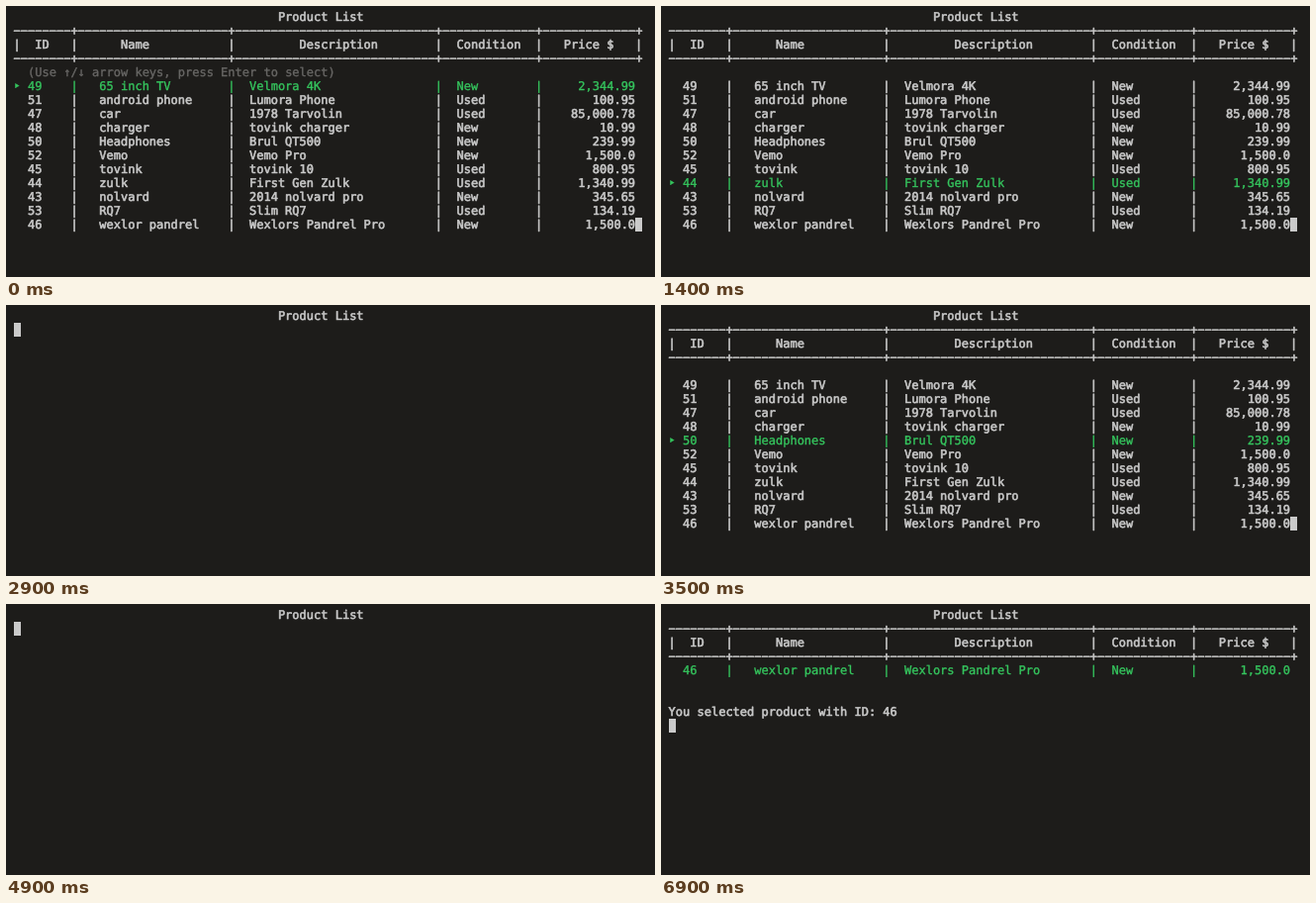
An HTML page with a canvas for the animation above (7 s loop, 656x274 px).

```html
<!DOCTYPE html>
<html lang="en">
<head>
<meta charset="utf-8">
<title>Product List</title>
<style>
  html, body { margin: 0; overflow: hidden; background: #1d1c1a; }
  canvas { display: block; }
</style>
</head>
<body>
<canvas id="screen" width="656" height="274"></canvas>
<script>
const ctx = document.getElementById('screen').getContext('2d');
const LOOP = 7000, TICK = 100;
const LEFT = 7.6, TOP = 4, CELL = 7.224, LINE = 14;
const BG = '#1d1c1a', WHITE = '#cacaca', GREEN = '#35c65e', GREY = '#686765';
const BORDERS = [8, 30, 59, 73];
const LAST_COL = 87, FIRST_ROW = 5;

const products = [
  ['49', '65 inch TV', 'Velmora 4K', 'New', '2,344.99'],
  ['51', 'android phone', 'Lumora Phone', 'Used', '100.95'],
  ['47', 'car', '1978 Tarvolin', 'Used', '85,000.78'],
  ['48', 'charger', 'tovink charger', 'New', '10.99'],
  ['50', 'Headphones', 'Brul QT500', 'New', '239.99'],
  ['52', 'Vemo', 'Vemo Pro', 'New', '1,500.0'],
  ['45', 'tovink', 'tovink 10', 'Used', '800.95'],
  ['44', 'zulk', 'First Gen Zulk', 'Used', '1,340.99'],
  ['43', 'nolvard', '2014 nolvard pro', 'New', '345.65'],
  ['53', 'RQ7', 'Slim RQ7', 'Used', '134.19'],
  ['46', 'wexlor pandrel', 'Wexlors Pandrel Pro', 'New', '1,500.0']
];

// Each run: screen cleared, table listed, selection moved along [time, index] points, item picked.
const runs = [
  { clear: 0, list: 0, pick: 2200, path: [[0, 0], [1000, 10], [1100, 10], [1900, 2]] },
  { clear: 2700, list: 3100, pick: 4000, path: [[3100, 0], [3500, 4]] },
  { clear: 4500, list: 5000, pick: 6500, path: [[5200, 0], [6200, 10]] }
];

function put(text, col, row, color = WHITE) {
  const x = LEFT + col * CELL, y = TOP + row * LINE + 11;
  ctx.fillStyle = ctx.strokeStyle = color;
  ctx.lineWidth = color === WHITE ? 0.6 : 0.35;
  ctx.fillText(text, x, y);
  ctx.strokeText(text, x, y);
}

function cursor(col, row) {
  ctx.fillStyle = WHITE;
  ctx.fillRect(Math.round(LEFT + col * CELL), TOP + row * LINE, 7, LINE);
}

function header() {
  const rule = [...'\u2212'.repeat(LAST_COL + 1)];
  for (const col of [...BORDERS, LAST_COL]) rule[col] = '+';
  put(rule.join(''), 0, 1);
  put(rule.join(''), 0, 3);
  for (const col of [0, ...BORDERS, LAST_COL]) put('|', col, 2);
  [['ID', 3], ['Name', 15], ['Description', 40], ['Condition', 62], ['Price $', 77]]
    .forEach(([label, col]) => put(label, col, 2));
}

function productRow([id, name, description, condition, price], row, color) {
  put(id, 2, row, color);
  put(name, 12, row, color);
  put(description, 33, row, color);
  put(condition, 62, row, color);
  put(price, LAST_COL - price.length, row, color);
  for (const col of BORDERS) put('|', col, row, color);
}

function selectedAt(path, t) {
  let [t0, i0] = path[0];
  for (const [t1, i1] of path) {
    if (t < t1) return Math.round(i0 + (i1 - i0) * Math.max(0, t - t0) / (t1 - t0));
    [t0, i0] = [t1, i1];
  }
  return i0;
}

function draw(t) {
  const run = runs.findLast(r => t >= r.clear);
  const selected = selectedAt(run.path, t);
  ctx.fillStyle = BG;
  ctx.fillRect(0, 0, 656, 274);
  put('Product List', 37, 0);

  if (t < run.list) return cursor(0, 1);
  header();

  if (t >= run.pick) {
    productRow(products[selected], 4, GREEN);
    put('You selected product with ID: ' + products[selected][0], 0, 7);
    return cursor(0, 8);
  }

  const untouched = t < run.path[0][0] + TICK;
  if (untouched) put('(Use ↑/↓ arrow keys, press Enter to select)', 2, 4, GREY);
  products.forEach((product, i) =>
    productRow(product, FIRST_ROW + i, i === selected ? GREEN : WHITE));
  put('‣', 0, FIRST_ROW + selected, GREEN);
  cursor(LAST_COL, FIRST_ROW + products.length - 1);
}

ctx.font = '12px "DejaVu Sans Mono", monospace';
ctx.textRendering = 'geometricPrecision';
ctx.lineJoin = 'round';

function frame() {
  draw(Math.floor(performance.now() % LOOP / TICK) * TICK);
  requestAnimationFrame(frame);
}
frame();
</script>
</body>
</html>
```
